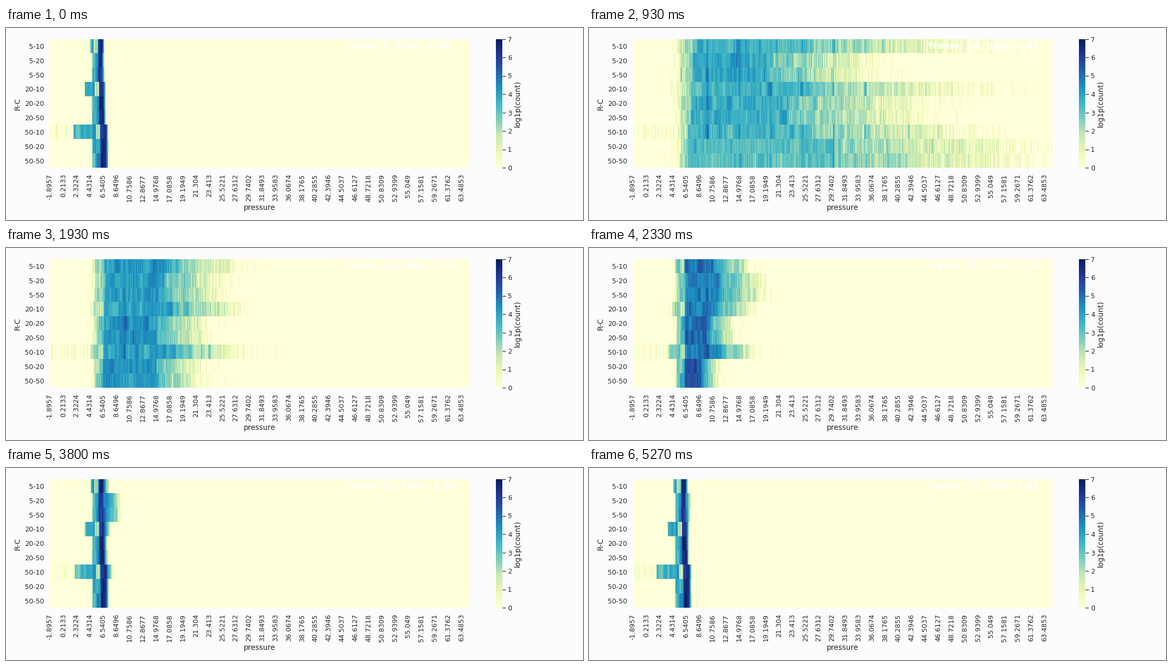
A matplotlib script for the animation above (5.34 s loop, 1080x360 px).

```python
import numpy as np
import matplotlib.pyplot as plt
from matplotlib.animation import FuncAnimation

W, H, DPI = 1080, 360, 90
STEPS, STEP_MS, FPS = 178, 30, 15
LEFT, RIGHT, TOP, BOTTOM = 82, 868, 20.5, 262
INK, PAPER = "#262626", "#fcfcff"
ROWS = [(r, c) for r in (5, 20, 50) for c in (10, 20, 50)]
MASS = 7000
RISE, HOLD = 12, 23  # the wave is fully open between these frames

plt.rcParams.update({"font.family": "DejaVu Sans", "text.color": INK,
                     "xtick.color": INK, "ytick.color": INK})

x = np.arange(LEFT, RIGHT) + 0.5
stripes = sum(np.exp(-((x - 222 - 59 * k) / 2.5) ** 2) for k in range(6))


def smooth_noise(seed, width=6):
    raw = np.random.default_rng(seed).normal(size=x.size)
    return np.convolve(raw, np.ones(width), "same") / np.sqrt(width)


grain = [smooth_noise(40 + k) for k in range(len(ROWS))]


def wave(frame, decay):
    """Opens smoothly, holds, then dies away exponentially."""
    u = min(frame / RISE, 1)
    return u * u * (3 - 2 * u) * np.exp(-max(frame - HOLD, 0) / decay)


def reach_and_decay(r, c):
    if c == 10:
        return 480, 8
    return 315 + 5.6 * (r - 5), 13.5 * (5 / r) ** 0.45


def expected_level(frame, r, c):
    """Expected log1p(count) across the pressure axis."""
    reach, decay = reach_and_decay(r, c)
    excess = reach * wave(frame, decay)
    opened = wave(frame, 10)
    calm = (1 - opened) ** 2
    core_share = np.interp(frame, [0, 14, 23, 35, 48],
                           [0.2, 0.48, 0.65, 0.5, 0.1])

    # Shoulder, core and tail, from low to high pressure
    start = 162 + 10 * opened - (0.7 * r * calm if c == 10 else 0)
    core_a = 172 + r / 12 + 22 * opened * (1 - r / 80)
    core_b = 180 + r / 6 + core_share * excess
    end = 183 + r / 6 + excess

    core = min(7, np.log(MASS / (core_b - core_a)))
    level = np.interp(x, [start, core_a, core_a + 2, core_b - 2, core_b, end],
                      core * np.array([0.5, 0.72, 1, 1, 0.8, 0.27]))
    if c == 10:
        gap = (x > core_a - 8) & (x < core_a)
        level = level - 2.5 * calm * gap
    level = level * np.exp(-np.maximum(start - x, 0) / (1 + 4 * opened))
    level = level * np.exp(-np.maximum(x - end, 0) / (0.8 + 0.08 * excess))
    level = level + (1.1 if c == 10 else 0.3) * opened * stripes * (x < end)
    if r > 4 * c:
        level = np.where(x < start, np.maximum(level, 0.25), level)
    return level


def heat(frame):
    rng = np.random.default_rng(1000 + frame)
    rows = []
    for (r, c), bands in zip(ROWS, grain):
        jitter = 0.3 * bands + 0.15 * rng.normal(size=x.size)
        rate = np.expm1(expected_level(frame, r, c)) * np.exp(jitter)
        rows.append(np.log1p(rng.poisson(rate)))
    return np.array(rows)


def pixel_axes(left, right):
    return fig.add_axes([left / W, 1 - BOTTOM / H,
                         (right - left) / W, (BOTTOM - TOP) / H])


def pixel_text(px, py, text, **style):
    return fig.text(px / W, 1 - py / H, text, **style)


fig = plt.figure(figsize=(W / DPI, H / DPI), dpi=DPI, facecolor=PAPER)

ax = pixel_axes(LEFT, RIGHT)
image = ax.imshow(heat(0), cmap="YlGnBu", vmin=0, vmax=7, aspect="auto",
                  interpolation="nearest",
                  extent=(LEFT, RIGHT, len(ROWS), 0))
ax.set_xticks([82.3 + 24.84 * i for i in range(32)],
              [f"{round(-1.895745 + 2.1090644 * i, 4)}" for i in range(32)],
              rotation=90)
ax.set_yticks(np.arange(len(ROWS)) + 0.5, [f"{r}-{c}" for r, c in ROWS])
ax.tick_params(length=0, labelsize=10)
ax.tick_params(axis="x", pad=9.5)
ax.tick_params(axis="y", pad=8.2)
ax.spines[:].set_visible(False)

bar = fig.colorbar(image, cax=pixel_axes(917, 929), ticks=range(8))
bar.outline.set_visible(False)
bar.ax.tick_params(length=4.8, width=1, pad=3.2, labelsize=10)

centred = dict(fontsize=11, ha="center", va="center")
pixel_text(474.5, 337, "pressure", **centred)
pixel_text(22, 142.5, "R-C", rotation=90, **centred)
pixel_text(957.5, 142.5, "log1p(count)", rotation=90, **centred)
caption = pixel_text(635.5, 39, "", fontsize=13.8, weight="bold",
                     color="white", va="baseline")


def update(step):
    # Show the latest frame that begins within this step
    frame = min(int((step * STEP_MS + 25) * FPS / 1000), 79)
    image.set_data(heat(frame))
    seconds = int(frame * 3.32) / 100
    caption.set_text(f"frame: {frame}, time: {seconds:.2f}")
    return image, caption


anim = FuncAnimation(fig, update, frames=STEPS, interval=STEP_MS,
                     init_func=lambda: update(0), repeat=True, repeat_delay=0)
plt.show()
```
